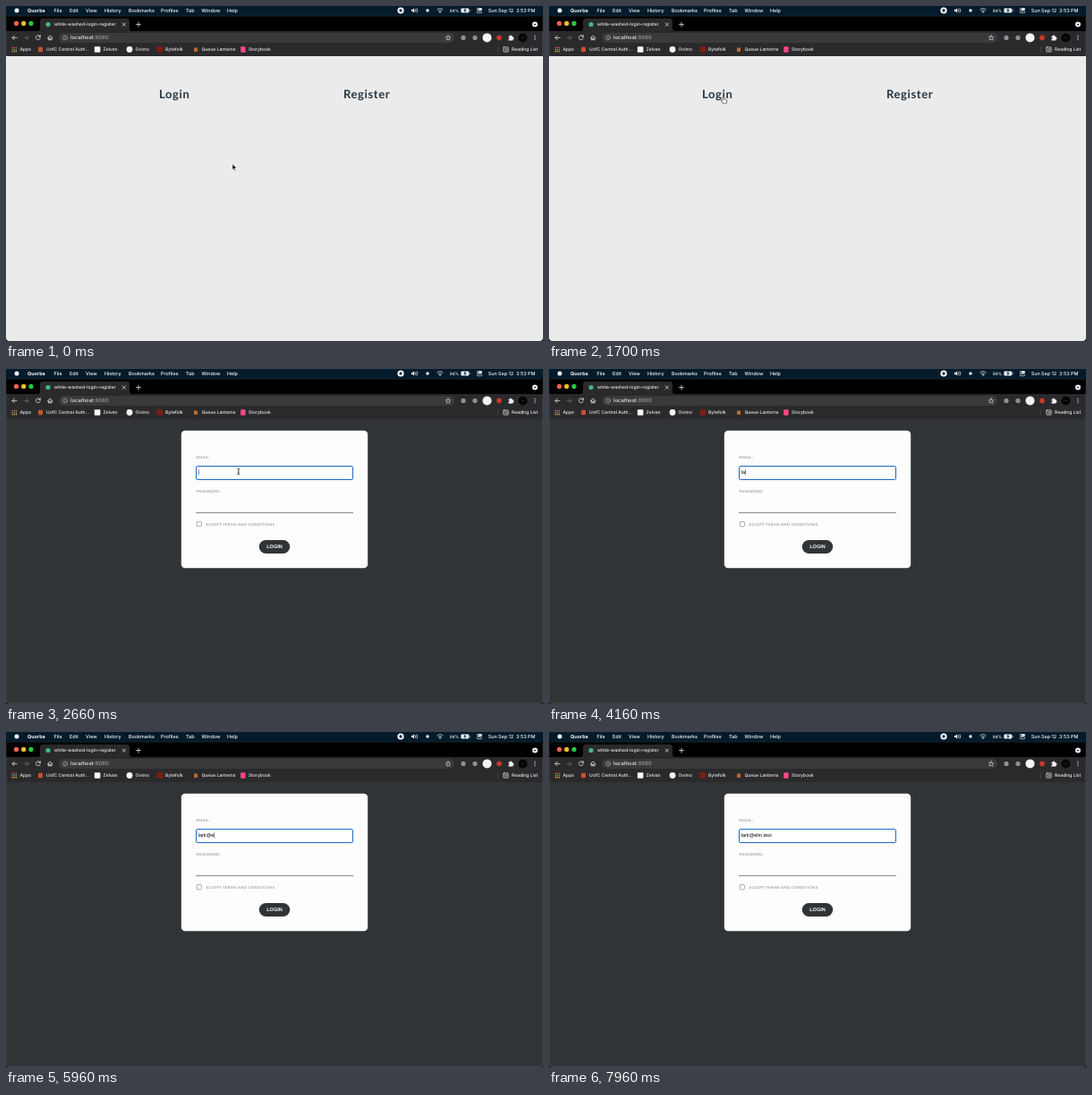
Write an HTML page that moves like this. It is 600x374 px and loops after 8000 ms.

```html
<!DOCTYPE html>
<html lang="en">
<head>
<meta charset="utf-8">
<title>Login form</title>
<style>
  html, body { margin: 0; width: 100%; height: 100%; overflow: hidden; background: #000; }
  svg { display: block; width: 100vw; height: 100vh; }
  text { white-space: pre; text-rendering: geometricPrecision; }
  .ui { font: 500 5px Inter, sans-serif; fill: #eeeff0; }
  .menu { font-size: 5.4px; fill: #fff; }
  .url { font-size: 5.83px; letter-spacing: .06px; }
  .muted { fill: #9fa1a3; }
  .heading { font: 700 13px Lato, sans-serif; letter-spacing: .62px; fill: #27353f; }
  .label { font: 700 4px Lato, sans-serif; letter-spacing: .45px; fill: #999; }
  .field { font: 5.556px "Liberation Sans", Arial, sans-serif; fill: #000; }
  .button { font: 700 5.556px "Liberation Sans", Arial, sans-serif; fill: #fff; }
  .line { fill: none; stroke: #e6e7e8; stroke-width: .8; stroke-linecap: round; stroke-linejoin: round; }
  .rule { fill: #8a8b8c; }
</style>
</head>
<body>
<svg viewBox="0 0 600 374">
  <!-- Menu bar -->
  <rect width="600" height="11" fill="#031b2b"/>
  <circle cx="12" cy="5" r="2.5" fill="#f4f6f8"/>
  <g id="menus" class="ui menu"></g>
  <circle cx="441" cy="5" r="3.6" fill="#fff"/>
  <rect x="439.6" y="3.6" width="2.8" height="2.8" rx=".4" fill="#031b2b"/>
  <path d="M453 4h1.3l1.8-1.5v5l-1.8-1.5H453z" fill="#fff"/>
  <path class="line" d="M457.4 3.7q1 1.3 0 2.6M459 2.8q1.7 2.2 0 4.4" stroke-width=".6"/>
  <circle cx="471" cy="5" r="1.8" fill="#dfe5ea"/>
  <path class="line" d="M481.8 4q3.2-2.8 6.4 0M483.2 5.6q1.8-1.5 3.6 0"/>
  <circle cx="485" cy="7" r=".8" fill="#fff"/>
  <rect x="508.3" y="2.6" width="9" height="4.8" rx="1.2" fill="#e8edf0"/>
  <rect x="517.8" y="4.1" width=".7" height="1.8" fill="#e8edf0"/>
  <path d="M513.4 2.2l-2.1 3.1h1.4l-.4 2.5 2.2-3.2h-1.4z" fill="#031b2b"/>
  <rect x="526" y="2.3" width="6" height="2.5" rx="1.25" fill="#fff"/>
  <circle cx="527.4" cy="3.55" r=".8" fill="#031b2b"/>
  <rect x="526.3" y="5.6" width="5.4" height="2.1" rx="1.05" fill="none" stroke="#fff" stroke-width=".6"/>

  <!-- Tab strip -->
  <rect y="11" width="600" height="17" fill="#000"/>
  <path d="M35 28q3 0 3-3v-8q0-3 3-3h94q3 0 3 3v8q0 3 3 3z" fill="#2a2a2c"/>
  <circle cx="11.5" cy="19.4" r="2.6" fill="#ff5f57"/>
  <circle cx="19.7" cy="19.4" r="2.6" fill="#febc2e"/>
  <circle cx="28" cy="19.4" r="2.6" fill="#28c840"/>
  <circle cx="47" cy="20.5" r="2.6" fill="#41b883"/>
  <text class="ui" x="54" y="22.4">white-washed-login-register</text>
  <path class="line" d="M130.2 19l3.2 3.2m0-3.2l-3.2 3.2M145.5 20.6h5m-2.5-2.5v5"/>
  <circle cx="591" cy="20.6" r="3" fill="#e8eaed"/>
  <path d="M589.6 19.9h2.8l-1.4 1.7z" fill="#000"/>

  <!-- Toolbar -->
  <rect y="28" width="600" height="28" fill="#2a2a2c"/>
  <path class="line" d="M12 35.4H7m2.3-2.3L7 35.4l2.3 2.3"/>
  <path class="line" d="M20 35.4h5m-2.3-2.3l2.3 2.3-2.3 2.3" style="stroke:#6d6e70"/>
  <path class="line" d="M38 33.8a2.5 2.5 0 1 0 .3 2.2M38.3 32.6v1.7h-1.7"/>
  <path class="line" d="M46.5 35.6l2.7-2.6 2.7 2.6M47.3 35.2v2.7h1.3v-1.8h1.2v1.8h1.3v-2.7"/>
  <rect x="59" y="30" width="442" height="11" rx="5.5" fill="#3a3a3b"/>
  <circle class="line" cx="66" cy="35.4" r="2.5" style="stroke:#b8babc;stroke-width:.6"/>
  <path d="M65.7 35h.6v1.8h-.6zM65.7 33.8h.6v.6h-.6z" fill="#b8babc"/>
  <text class="ui url" x="72" y="37.4">localhost<tspan class="muted">:8080</tspan></text>
  <path class="line" d="M494 32.7l.8 1.9 2 .2-1.5 1.3.5 2-1.8-1.1-1.8 1.1.5-2-1.5-1.3 2-.2z" style="stroke-width:.6"/>
  <circle cx="511" cy="35.4" r="2.6" fill="#8f9296"/>
  <circle cx="524" cy="35.4" r="2.6" fill="#8c8f92"/>
  <circle cx="537.5" cy="35.4" r="5" fill="#f4f4f4"/>
  <circle cx="551" cy="35.4" r="2.8" fill="#c9382b"/>
  <path d="M561.4 33.7h1.4a1.1 1.1 0 0 1 2.2 0h1.4v1.4a1.1 1.1 0 0 1 0 2.2v1.1h-5v-1.3a1 1 0 0 0 0-2z" fill="#f0f1f2"/>
  <circle cx="577.5" cy="35.4" r="5" fill="#060807"/>
  <circle cx="577.5" cy="35.4" r=".7" fill="#35503f"/>
  <path d="M590.4 32.8h1.1v1.1h-1.1zM590.4 34.9h1.1V36h-1.1zM590.4 37h1.1v1.1h-1.1z" fill="#e8eaed"/>

  <!-- Bookmarks -->
  <g id="apps"></g>
  <rect x="36" y="45.8" width="5" height="5.4" rx="1" fill="#c9502f"/>
  <rect x="98.8" y="45.2" width="6.6" height="6.6" rx=".8" fill="#f7f7f7"/>
  <circle cx="138" cy="48.5" r="3.4" fill="#f4f4f4"/>
  <rect x="168.6" y="45.2" width="6.6" height="6.6" rx=".8" fill="#7e1d14"/>
  <rect x="210" y="46.5" width="4" height="4.4" fill="#c2692a"/>
  <rect x="262.2" y="45.3" width="5.4" height="6.4" rx=".8" fill="#ff4785"/>
  <g id="bookmarks" class="ui"></g>
  <rect x="549.4" y="45" width=".5" height="7" fill="#505152"/>
  <rect class="line" x="555.8" y="45.9" width="5.4" height="5.2" rx=".5" style="stroke-width:.7"/>
  <path class="line" d="M557.2 47.4h.2m1 0h1.6M557.2 48.6h.2m1 0h1.6M557.2 49.8h.2m1 0h1.6" style="stroke-width:.5"/>

  <!-- Page -->
  <rect y="56" width="600" height="318" fill="#ebebeb"/>
  <text class="heading" x="171" y="103.3">Login</text>
  <text class="heading" x="377" y="103.3">Register</text>

  <g id="modal">
    <rect y="56" width="600" height="318" fill="#303437"/>
    <rect x="195.83" y="68.8" width="208.34" height="153.5" rx="4.17" fill="#fdfdfd"/>
    <text class="label" x="212.5" y="100.2">EMAIL:</text>
    <rect class="rule" x="212" y="122" width="176" height="1"/>
    <g id="focus">
      <rect x="212.5" y="108.5" width="175" height="15" rx="1.2" fill="#fff" stroke="#1f68c6"/>
      <text id="email" class="field" x="214.7" y="117.2"></text>
      <rect id="caret" y="112.2" width=".5" height="6.2" fill="#111"/>
    </g>
    <text class="label" x="212.5" y="137.6">PASSWORD:</text>
    <rect class="rule" x="212" y="160" width="176" height="1"/>
    <rect x="213.2" y="170.6" width="5.2" height="5.2" rx=".9" fill="#fff" stroke="#707070" stroke-width=".6"/>
    <text class="label" x="223.3" y="175">ACCEPT TERMS AND CONDITIONS</text>
    <rect x="282.8" y="191" width="34.4" height="15" rx="7.5" fill="#303437"/>
    <text class="button" x="300" y="200.4" text-anchor="middle">LOGIN</text>
  </g>

  <!-- Window edge -->
  <path d="M0 370v4h4q-4 0-4-4zM600 370v4h-4q4 0 4-4z" fill="#06141d"/>
  <rect x=".25" y="11.25" width="599.5" height="362" rx="4" fill="none" stroke="#fff" stroke-opacity=".2" stroke-width=".5"/>

  <!-- Pointers, each with its hot spot at 0,0 -->
  <g id="pointer">
    <path id="arrow" d="M0 0v6.3l1.4-1.3 1 2.3 1.1-.5-1-2.2h2z" fill="#000" stroke="#fff" stroke-width=".5"/>
    <path id="hand" d="M-.8.4q0-.9.7-.9t.7.9v2.3l2.6.6q.9.3.8 1.3l-.6 2.9h-4L-2.3 4.8q-.4-1 .5-1l1 .7z" fill="#fff" stroke="#000" stroke-width=".5"/>
    <path id="beam" d="M-1.4-3q1.4 0 1.4.8 0-.8 1.4-.8M0-2.2v4.6M-1.4 3.2q1.4 0 1.4-.8 0 .8 1.4.8M-.7.8H.7" fill="none" stroke="#111" stroke-width=".75"/>
  </g>
</svg>
<script>
  const LOOP = 8000, OPEN = 1715, FOCUS = 2560;
  const EMAIL = 'lark@elm.test';
  const KEYS = [3780, 4080, 4420, 4620, 5250, 5850, 6080, 6300, 6480, 6720, 6920, 7100, 7300];
  // time, x, y
  const PATH = [[0, 253, 176.5], [180, 253, 176.5], [820, 214, 114], [1250, 194.8, 101.3], [1900, 194.8, 101.3], [2420, 259.8, 114.4]];

  const $ = id => document.getElementById(id);
  const show = (id, on) => $(id).setAttribute('visibility', on ? 'inherit' : 'hidden');

  function add(parent, tag, attrs, content = '') {
    const node = document.createElementNS($('menus').namespaceURI, tag);
    for (const key in attrs) node.setAttribute(key, attrs[key]);
    node.textContent = content;
    $(parent).append(node);
  }

  const words = (parent, y, list) =>
    list.forEach(([x, label, weight = 500]) => add(parent, 'text', { x, y, 'font-weight': weight }, label));

  words('menus', 7, [
    [24, 'Quorba', 700], [53.5, 'File'], [71, 'Edit'], [89, 'View'], [110, 'History'], [137, 'Bookmarks'],
    [173, 'Profiles'], [201, 'Tab'], [218.5, 'Window'], [247, 'Help'], [538.7, 'Sun Sep 12  3:53 PM']
  ]);
  add('menus', 'text', { x: 495.7, y: 6.8, style: 'font-size:4.6px' }, '94%');
  words('bookmarks', 50.3, [
    [15.5, 'Apps'], [45, 'UofC Central Auth...'], [108.5, 'Zelvan'], [144.5, 'Ovimo'], [178, 'Bytefolk'],
    [218.5, 'Queue Lanterns'], [271, 'Storybook'], [565, 'Reading List']
  ]);
  ['#e2574c', '#4fa862', '#d9a13b'].forEach((fill, row) => {
    for (let col = 0; col < 3; col++)
      add('apps', 'rect', { x: 6.6 + col * 2.1, y: 45.8 + row * 2.1, width: 1.4, height: 1.4, fill });
  });

  function pointerAt(t) {
    const next = PATH.findIndex(p => p[0] > t);
    if (next < 0) return PATH.at(-1).slice(1);
    const [a, b] = [PATH[next - 1], PATH[next]];
    const u = (t - a[0]) / (b[0] - a[0]);
    const eased = u * u * (3 - 2 * u);
    return [1, 2].map(i => a[i] + (b[i] - a[i]) * eased);
  }

  function draw(t) {
    const open = t >= OPEN, focused = t >= FOCUS;
    show('modal', open);
    show('focus', open && focused);

    const typed = KEYS.filter(k => k <= t).length;
    const lastInput = typed ? KEYS[typed - 1] : FOCUS;
    $('email').textContent = EMAIL.slice(0, typed);
    $('caret').setAttribute('x', 214.9 + (typed ? $('email').getComputedTextLength() : 0));
    show('caret', focused && (t - lastInput) % 1000 < 500);

    const [x, y] = pointerAt(t);
    const overHeading = !open && y < 108;
    const overField = open && x > 212 && y > 107;
    $('pointer').setAttribute('transform', `translate(${x} ${y})`);
    show('hand', !typed && overHeading);
    show('beam', !typed && overField);
    show('arrow', !typed && !overHeading && !overField);
  }

  const start = performance.now();
  function tick() {
    draw((performance.now() - start) % LOOP);
    requestAnimationFrame(tick);
  }
  tick();
</script>
</body>
</html>
```
